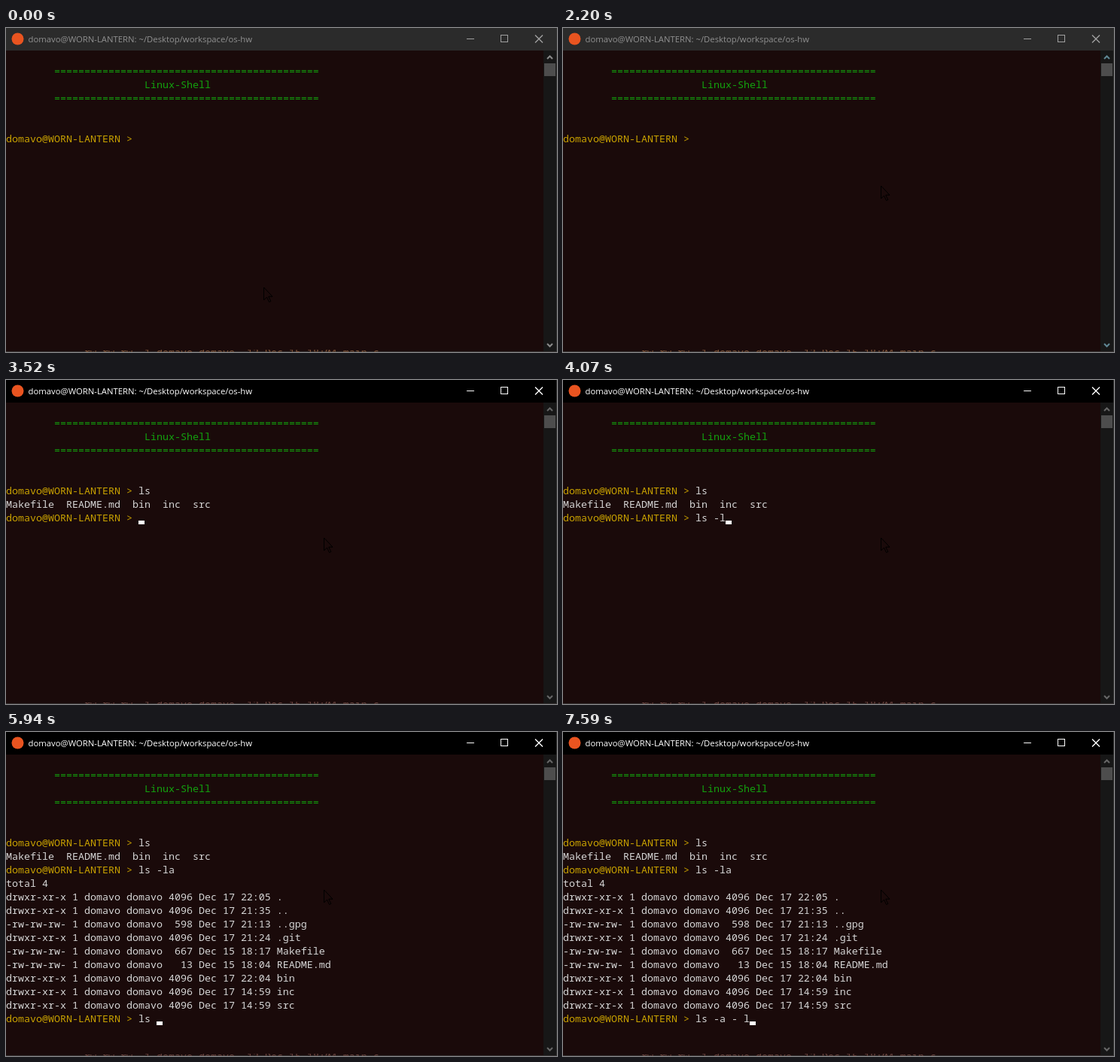
These frames come from a looping animation (732x431 px, 8000 ms). An HTML page:

```html
<!DOCTYPE html>
<html lang="en">
<head>
<meta charset="utf-8">
<title>Linux-Shell</title>
<style>
  html, body { margin: 0; width: 100%; height: 100%; overflow: hidden; background: #1a0a0a; }
  svg { display: block; width: 732px; height: 431px; }
  .mono { font: 13.333px "Noto Sans Mono", "DejaVu Sans Mono", monospace; white-space: pre; fill: #d6d6d6; }
  .title { font: 11.3px "Open Sans", "Noto Sans", sans-serif; }
  .green { fill: #13a10e; }
  .prompt { fill: #c9a200; }
  #bar { fill: #2b2b2b; }
  #title { fill: #909090; }
  #buttons { stroke: #a0a0a0; fill: none; }
  #arrows { stroke: #8a8a8a; stroke-width: 2; fill: none; }
  #under { fill: #80563a; }
  .active #bar { fill: #000; }
  .active #title { fill: #fff; }
  .active #buttons { stroke: #fff; }
  .active #arrows { stroke: #666; }
  .active #under { fill: #6b4640; }
  .hover #arrows { stroke: #5f8794; }
</style>
</head>
<body>
<svg id="stage" viewBox="0 0 732 431">
  <rect y="430" width="732" height="1" fill="#343030"/>
  <text id="under" class="mono" x="104" y="436"></text>
  <rect width="732" height="428" fill="#1a0a0a"/>
  <rect id="bar" width="732" height="30"/>
  <circle cx="15.5" cy="14.5" r="8" fill="#e95420"/>
  <text id="title" class="title" x="29.500" y="19"></text>
  <g id="buttons">
    <path d="M612 14.5h10M657.5 9.5h9v9h-9z" shape-rendering="crispEdges"/>
    <path d="M703 9.500l10 10m0-10l-10 10" stroke-width="1.400"/>
  </g>
  <rect x="714" y="30" width="17" height="400" fill="#171717"/>
  <rect x="715" y="47" width="15" height="17" fill="#4d4d4d"/>
  <path id="arrows" d="M719 41l3.500-3.500 3.500 3.500M719 420l3.500 3.500 3.500-3.500"/>
  <rect x="731" width="1" height="431" fill="#343434"/>
  <g id="rows"></g>
  <rect id="caret" width="8" height="5" fill="#fff"/>
  <path id="mouse" d="M.5 1v17l4-4 3 6.500 2.300-1-3-6.300h5.200z" fill="#1a0a0a" stroke="#000"/>
</svg>
<script>
const LOOP = 8000;
const USER = "domavo", HOST = USER + "@WORN-LANTERN", PROMPT = HOST + " > ";
const $ = id => document.getElementById(id);

const rule = "=".repeat(44);
const header = [[1, rule, 8], [2, "Linux-Shell", 23], [3, rule, 8]];
const files = ["Makefile  README.md  bin  inc  src"];
const entry = (mode, size, date, name) =>
  `${mode} 1 ${USER} ${USER} ${String(size).padStart(4)} Dec ${date} ${name}`;
const dir = (date, name) => entry("drwxr-xr-x", 4096, date, name);
const file = (size, date, name) => entry("-rw-rw-rw-", size, date, name);
const listing = [
  "total 4",
  dir("17 22:05", "."),
  dir("17 21:35", ".."),
  file(598, "17 21:13", "..gpg"),
  dir("17 21:24", ".git"),
  file(667, "15 18:17", "Makefile"),
  file(13, "15 18:04", "README.md"),
  dir("17 22:04", "bin"),
  dir("17 14:59", "inc"),
  dir("17 14:59", "src")
];

// Each step: time, finished commands, typed text (null: waiting for output)
const steps = [
  [0, 0, ""],
  [3080, 0, "l"], [3190, 0, "ls"],
  [3520, 1, ""], [3850, 1, "ls"], [3960, 1, "ls "], [4070, 1, "ls -l"], [4620, 1, "ls -la"],
  [4950, 1, null],
  [5060, 2, ""], [5500, 2, "l"], [5720, 2, "ls"], [5940, 2, "ls "],
  [6490, 2, "ls -"], [6600, 2, "ls -a"], [7040, 2, "ls -a "],
  [7260, 2, "ls -a -"], [7370, 2, "ls -a - "], [7590, 2, "ls -a - l"]
];
const history = [["ls", files], ["ls -la", listing]];
const mousePath = [[0, 342, 344], [1210, 382, 276], [1320, 422, 209]];
const at = (list, t) => list.filter(s => s[0] <= t).pop();

function addText(row, text, col = 0, cls = "") {
  const el = document.createElementNS("http://www.w3.org/2000/svg", "text");
  el.setAttribute("class", "mono " + cls);
  el.setAttribute("x", col * 8);
  el.setAttribute("y", 44 + row * 18);
  el.textContent = text;
  $("rows").append(el);
}

function addCommand(row, text) {
  addText(row, PROMPT, 0, "prompt");
  addText(row, text, PROMPT.length);
}

function drawConsole([, done, typed]) {
  $("rows").replaceChildren();
  header.forEach(([row, text, col]) => addText(row, text, col, "green"));
  let row = 6;
  for (const [command, output] of history.slice(0, done)) {
    addCommand(row++, command);
    output.forEach(line => addText(row++, line));
  }
  const waiting = typed === null;
  addCommand(row, waiting ? history[done][0] : typed);
  $("caret").setAttribute("x", waiting ? 0 : 8 * (PROMPT.length + typed.length));
  $("caret").setAttribute("y", 43 + 18 * (waiting ? row + 1 : row));
}

let shown;
function frame(now) {
  const t = now % LOOP, step = at(steps, t);
  if (step !== shown) drawConsole(shown = step);
  $("stage").setAttribute("class", t >= 2420 ? "active" : t >= 2200 ? "hover" : "");
  $("caret").setAttribute("visibility", t >= 2970 ? "visible" : "hidden");
  const [, x, y] = at(mousePath, t);
  $("mouse").setAttribute("transform", `translate(${x} ${y})`);
  requestAnimationFrame(frame);
}

$("title").textContent = HOST + ": ~/Desktop/workspace/os-hw";
$("under").textContent = `rw-rw-rw- 1 ${USER} ${USER}  13 Dec 15 18:04 main.c`;
frame(0);
</script>
</body>
</html>
```
